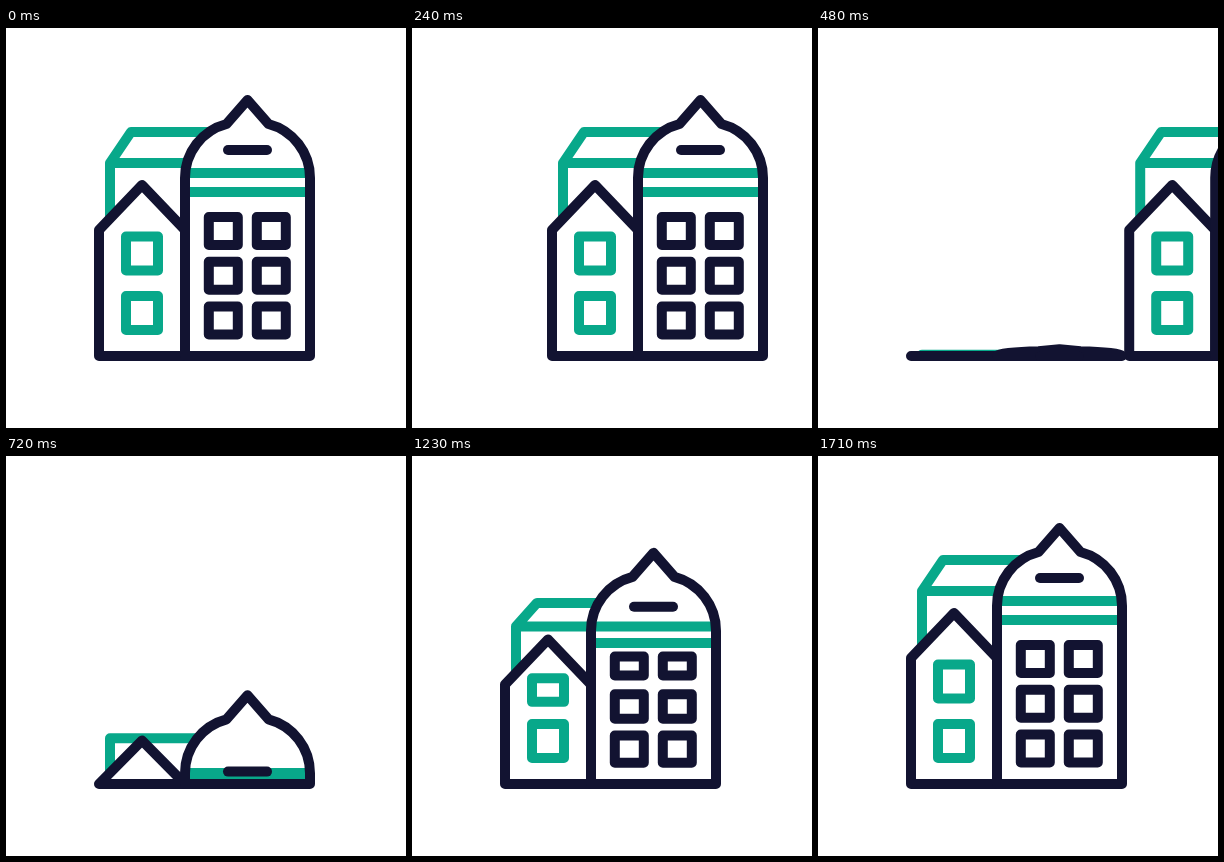
Recreate the animation shown at these times as an HTML page. Size 400 px wide and 400 px high, loop 3740 ms.

```html
<!DOCTYPE html>
<html lang="en">
<head>
<meta charset="utf-8">
<title>Buildings</title>
<style>
  html, body { margin: 0; width: 100%; height: 100%; overflow: hidden; background: #fff; }
  svg { display: block; width: 100%; height: 100%; }
  path { stroke-width: 10; stroke-linecap: round; stroke-linejoin: round; fill: none; }
  .navy { stroke: #121331; }
  .green { stroke: #08a88a; }
  .solid { fill: #fff; }
  .flat { stroke-linecap: butt; }
</style>
</head>
<body>
<svg viewBox="0 0 400 400"><g id="leaving"></g><g id="growing"></g></svg>
<script>
const LOOP = 3740, STEP = 30, APPEAR = 420, GONE = 600;
const GROUND = 328, LEFT = 179, RIGHT = 304;

const clamp = x => Math.min(1, Math.max(0, x));
const easeIn = (t, start, end, power) => clamp((t - start) / (end - start)) ** power;
const easeOut = (t, start, length, power) => 1 - (1 - clamp((t - start) / length)) ** power;

// A window pops up squashed and below its place, then opens upwards.
function windowPath(t, x, y, w, h, start, length, drop) {
  const open = easeOut(t, start, length, 2.5);
  if (!open) return '';
  const cy = y + drop * (1 - open), half = h * open / 2;
  return `M${x - w / 2} ${cy - half}h${w}v${half * 2}h${-w}z`;
}

function boxPath(t) {
  const rise = 47 * easeIn(t, 450, 725, 1.6), grow = easeOut(t, 730, 985, 2);
  const corner = GROUND - rise - 146 * grow;
  const top = GROUND - rise - 177 * grow;
  return `M104 ${GROUND}V${corner}H190M104 ${corner}L125 ${top}H208`;
}

function housePath(t) {
  const roof = 45 * easeIn(t, 480, 725, 1.6);
  const eaves = GROUND - 126 * easeOut(t, 744, 956, 2.2);
  return `M93 ${GROUND}V${eaves}L136 ${eaves - roof}L${LEFT} ${eaves}V${GROUND}z`;
}

const towerGrowth = t => easeOut(t, 696, 980, 2.5);

function towerPath(t) {
  const k = easeIn(t, APPEAR, 696, 1.6);
  const side = GROUND - 178 * towerGrowth(t);
  const arc = `A55.7 ${55.7 * k} 0 0 1 `;
  const shoulder = side - 54 * k;
  return `M${LEFT} ${GROUND}V${side}${arc}220.5 ${shoulder}L241.5 ${side - 78 * k}` +
    `L262.5 ${shoulder}${arc}${RIGHT} ${side}V${GROUND}z`;
}

function bar(t, x1, x2, height) {
  return `M${x1} ${GROUND - height * towerGrowth(t)}H${x2}`;
}

const houseWindows = t => [285, 225.5].map((y, i) =>
  windowPath(t, 136, y, 32, 34, 755 + 290 * i, 490, 28)).join('');

const towerWindows = t => [292.5, 247.8, 203].map((y, i) =>
  [217.3, 265.3].map(x => windowPath(t, x, y, 29, 28, 825 + 105 * i, 530, 22)).join('')).join('');

const layers = [
  ['green', boxPath],
  ['navy solid', housePath],
  ['green', houseWindows],
  ['solid', towerPath],
  ['green flat', t => bar(t, LEFT, RIGHT, 183) + bar(t, LEFT, RIGHT, 164)],
  ['navy', towerWindows],
  ['navy', towerPath],
  ['navy', t => bar(t, 222, 261, 206)]
];

function build(id) {
  const group = document.getElementById(id);
  const paths = layers.map(([cls]) => {
    const path = document.createElementNS('http://www.w3.org/2000/svg', 'path');
    path.setAttribute('class', cls);
    return group.appendChild(path);
  });
  const pose = t => paths.forEach((path, i) => path.setAttribute('d', layers[i][1](t)));
  const show = on => group.setAttribute('visibility', on ? 'visible' : 'hidden');
  return { group, pose, show };
}

const leaving = build('leaving'), growing = build('growing');
leaving.pose(LOOP);

function render(t) {
  leaving.show(t < GONE);
  leaving.group.setAttribute('transform', `translate(${47 * (t / 240) ** 2.215})`);
  growing.show(t >= APPEAR);
  growing.pose(t);
}

const origin = performance.now();
function tick() {
  const t = (performance.now() - origin) % LOOP;
  render(Math.floor(t / STEP) * STEP);
  requestAnimationFrame(tick);
}
tick();
</script>
</body>
</html>
```
